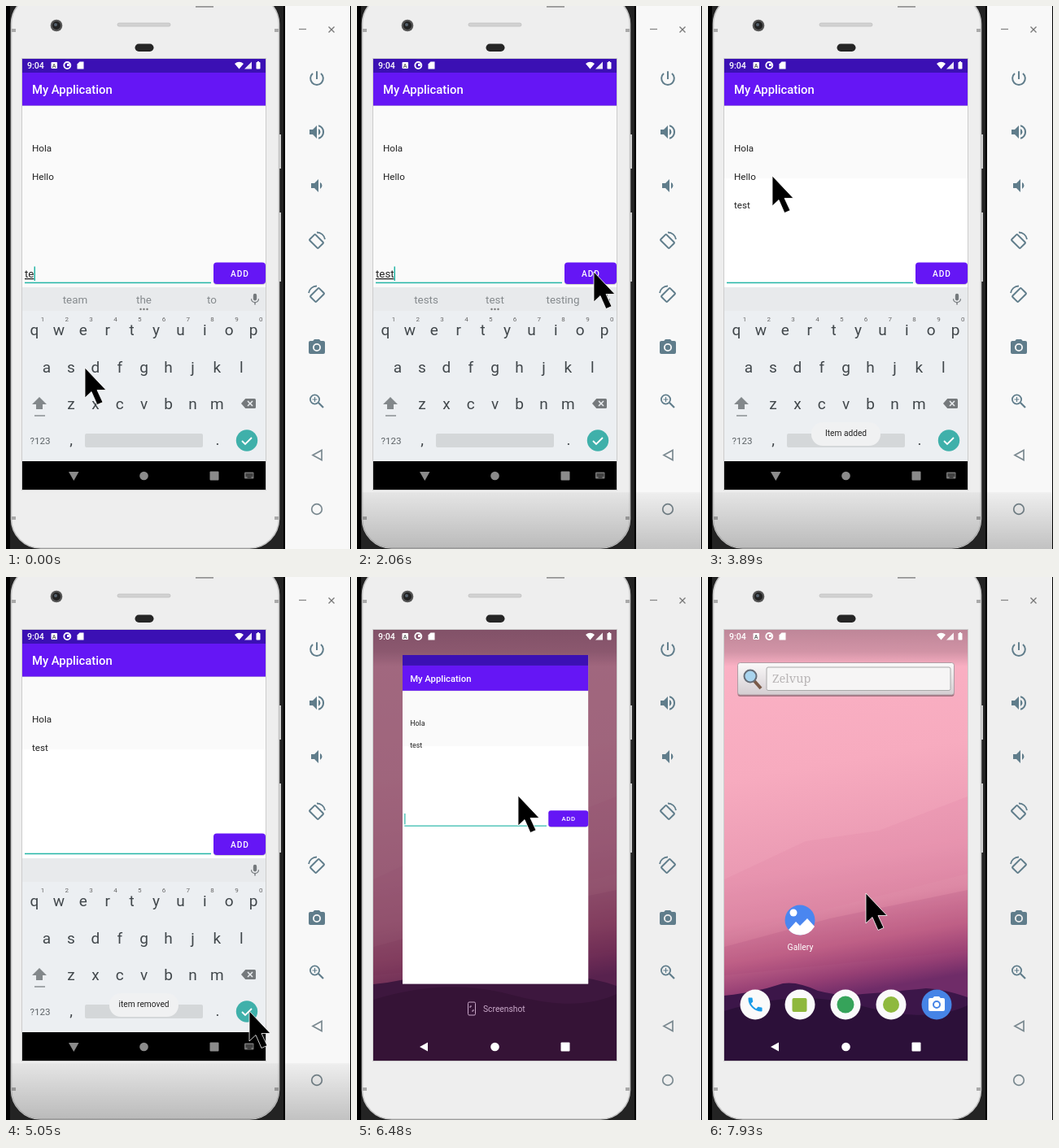
Recreate the animation shown at these times as an HTML page. Size 424 by 668 pixels, loop 8000 ms.

```html
<!DOCTYPE html>
<html lang="en">
<head>
<meta charset="utf-8">
<title>List app demo</title>
<style>
html, body { margin: 0; width: 100%; height: 100%; overflow: hidden; background: #000; }
svg { display: block; width: 424px; height: 668px; font-family: Roboto, sans-serif; }
</style>
</head>
<body>
<svg id="stage" viewBox="0 0 424 668"></svg>
<script>
const text = (x, y, size, str, fill, more = '') =>
  `<text x="${x}" y="${y}" font-size="${size}" fill="${fill}" ${more}>${str}</text>`;
const mid = (x, y, size, str, fill, more = '') =>
  text(x, y, size, str, fill, 'text-anchor="middle" ' + more);
const rect = (x, y, w, h, fill, more = '') =>
  `<rect x="${x}" y="${y}" width="${w}" height="${h}" fill="${fill}" ${more}/>`;
const dot = (x, y, r, fill, more = '') =>
  `<circle cx="${x}" cy="${y}" r="${r}" fill="${fill}" ${more}/>`;
const path = (d, fill, more = '') => `<path d="${d}" fill="${fill}" ${more}/>`;
const line = (d, color, w) => path(d, 'none', `stroke="${color}" stroke-width="${w}"`);
// a 24-unit icon centred on x, y
const icon = (x, y, s, d, fill, more) =>
  path(d, fill, `transform="translate(${x} ${y}) scale(${s}) translate(-12 -12)" ${more || ''}`);
const group = (id, body, more = '') => `<g id="${id}" ${more}>${body}</g>`;
const fade = (id, dir, stops) => `<linearGradient id="${id}" gradientUnits="userSpaceOnUse" ${dir}>` +
  stops.map(([o, c, a = 1]) => `<stop offset="${o}" stop-color="${c}" stop-opacity="${a}"/>`).join('') +
  '</linearGradient>';

const CAMERA = 'M9 2L7.2 4H4a2 2 0 0 0-2 2v12a2 2 0 0 0 2 2h16a2 2 0 0 0 2-2V6a2 2 0 0 0-2-2h-3.2L15 2zM12 17a5 5 0 1 1 0-10 5 5 0 0 1 0 10z';
const SPEAKER = 'M3 9v6h4l5 5V4L7 9zM16.5 12A4.5 4.5 0 0 0 14 8v8a4.5 4.5 0 0 0 2.5-4z';
const WAVE = 'M14 3.2v2.1a7 7 0 0 1 0 13.4v2.1a9 9 0 0 0 0-17.6z';
const POWER = 'M13 3h-2v10h2zM17.8 5.2l-1.4 1.4A7 7 0 1 1 7.6 6.6L6.2 5.2a9 9 0 1 0 11.6 0z';
const MIC = 'M12 14a3 3 0 0 0 3-3V5a3 3 0 0 0-6 0v6a3 3 0 0 0 3 3zM17.3 11a5.3 5.3 0 0 1-10.6 0H5a7 7 0 0 0 6 6.7V21h2v-3.3a7 7 0 0 0 6-6.7z';
const CALL = 'M6.6 10.8a15 15 0 0 0 6.6 6.6l2.2-2.2a1 1 0 0 1 1-.2 11 11 0 0 0 3.6.6 1 1 0 0 1 1 1V20a1 1 0 0 1-1 1A17 17 0 0 1 3 4a1 1 0 0 1 1-1h3.5a1 1 0 0 1 1 1 11 11 0 0 0 .6 3.6 1 1 0 0 1-.3 1z';

function sidebar() {
  const c = '#607d8b', g = '#7a8990';
  const turn = flip => `<g transform="translate(382 ${flip ? 354 : 288}) scale(${flip ? -1 : 1} 1)">` +
    rect(-7.5, -5, 15, 10, 'none', `rx="1" transform="translate(-.5 1.5) rotate(45)" stroke="${c}" stroke-width="2"`) +
    line('M0-9.500A10 10 0 0 1 10-1', c, 1.8) + '</g>';
  return rect(343, 0, 80, 668, '#f8f8f8', 'id="side"') +
    line('M360 28.5h9', '#888', 1.3) + line('M396.5 25.5l7 7m0-7l-7 7', '#777', 1.3) +
    icon(382, 89, .98, POWER, c) + icon(382, 155, 1, SPEAKER + WAVE, c) + icon(384, 221, 1, SPEAKER, c) +
    turn(false) + turn(true) + icon(382, 420, 1, CAMERA, c) + dot(382, 420, 3.2, c) +
    dot(379.5, 484, 5.6, 'none', `stroke="${c}" stroke-width="1.8"`) +
    line('M384 488l6 6', c, 2.2) + line('M376.5 484h6m-3-3v6', c, 1.2) +
    line('M388 546.5v12l-11-6z', g, 1.7) + dot(382, 619, 6.3, 'none', `stroke="${g}" stroke-width="1.7"`);
}

function phone() {
  const shape = 'x="6.5" y="-14" width="329" height="681" rx="36"';
  return rect(5, 0, 336, 668, '#232323') + rect(334, 158, 4, 42, '#d5d5d5') + rect(334, 254, 4, 85, '#d5d5d5') +
    `<rect ${shape} fill="#eeeeee" stroke="#c4c4c4" stroke-width="1.6"/>` +
    line('M7 30h5M330 30h5M7 630h5M330 630h5', '#aaa', 4) + line('M233 .8h22', '#999', 2) +
    group('shade', `<rect ${shape} fill="url(#low)"/>` + rect(343, 598, 80, 70, 'url(#low)')) +
    dot(62, 24, 7.3, '#555') + dot(62, 24, 5, '#222') + dot(61, 23, 2, '#53606c') +
    rect(137, 21, 65, 4, '#d2d2d2', 'rx="2" stroke="#bbb" stroke-width=".7"') +
    rect(158.5, 46.5, 23, 9.5, '#252525', 'rx="4.7"') +
    rect(19.5, 64.5, 300, 531, 'none', 'stroke="#ccc"');
}

function home() {
  const apps = [58, 113, 169, 225, 281].map((x, i) => dot(x, 526, 18.5, i < 4 ? '#fafafa' : '#4684e6')).join('');
  return rect(20, 65, 299, 530, 'url(#sky)') +
    path('M20 372L120 325L210 312L319 270V365L200 395L20 440Z', '#d9779a', 'opacity=".16"') +
    path('M20 455L150 420L319 385V460L20 490Z', '#9c3a6c', 'opacity=".15"') +
    group('hills', path('M20 515Q60 511 92 500Q110 497 135 509Q165 517 190 513Q240 509 268 506Q290 507 319 517V620H20Z', '#3c1649') +
      path('M20 534Q110 506 190 528T319 527V620H20Z', '#2c1039')) +
    rect(20, 65, 299, 45, 'url(#scrim)') + rect(20, 65, 299, 530, '#401832', 'id="dim"') +
    group('launcher',
      rect(36.5, 106, 266, 41, '#000', 'rx="3" opacity=".35"') +
      rect(36.5, 105.5, 266, 39.5, 'url(#bar)', 'rx="3" stroke="#b09ca4" stroke-width="1"') +
      rect(72, 111, 226, 28.5, '#f6f5f5', 'rx="2" stroke="#aaa" stroke-width="1"') +
      line('M57 128l8 9', '#7a5a48', 4) + dot(52, 122, 7.5, '#a9d4ee', 'stroke="#666d78" stroke-width="2"') +
      text(79, 130, 14.5, 'Zelvup', '#b9b5b6', 'font-family="Noto Serif, serif"') +
      dot(113, 422, 18.5, '#4a86f0') + dot(105, 413, 4.5, '#fff') +
      path('M99 434l9-10 5 5 9-9 9 10Q124 441 113 440.5 104 440 99 434Z', '#fff') +
      mid(113.5, 459, 10.4, 'Gallery', '#fff') + apps +
      icon(58, 526, .95, CALL, '#1a9be8') + rect(103.5, 518, 18, 17, '#8fb83d', 'rx="2"') +
      dot(169, 526, 10.5, '#36a35a') + dot(225, 526, 10, '#8fb93e') +
      icon(281, 526, 1, CAMERA, '#fff') + dot(281, 526, 3, '#fff')) +
    group('shot', rect(136.5, 523, 9, 16, 'none', 'rx="1.5" stroke="#c9a9c9"') +
      line('M139 530v-2h2m2 4v2h-2', '#c9a9c9', 1) + text(155, 535, 10.3, 'Screenshot', '#c9a9c9')) +
    path('M87 572.5v11l-10-5.5z', '#fff') + dot(169.5, 578, 5.3, '#fff') + rect(250.5, 572.5, 11, 11, '#fff', 'rx="1"');
}

function keyboard() {
  const ink = '#41474b';
  const row = (keys, x, y) => [...keys].map((k, i) => mid(x + i * 29.9, y, 19, k, ink)).join('');
  const digits = [...'1234567890'].map((k, i) => mid(45 + i * 29.8, 388, 8, k, '#666')).join('');
  return rect(20, 346, 299, 214, '#eceff2') + rect(20, 346, 299, 29, '#e8eaec') +
    [85, 169.5, 253].map((x, i) => mid(x, 366, 13.4, '', '#858a8d', `id="hint${i}"`)).join('') +
    group('dots', [165.5, 169.5, 173.5].map(x => dot(x, 373, 1.2, '#777')).join('')) +
    icon(306, 361, .72, MIC, '#74797c', 'id="mic"') +
    row('qwertyuiop', 35, 405) + digits + row('asdfghjkl', 50, 450.5) + row('zxcvbnm', 80, 496) +
    path('M41 481l9 9h-5v6h-8v-6h-5z', '#83888b') + line('M35 504h13', '#83888b', 1.4) +
    icon(298, 489, .75, 'M22 4H7L0 12l7 8h15a2 2 0 0 0 2-2V6a2 2 0 0 0-2-2z', '#75797c') +
    line('M297 486l6 6m0-6l-6 6', '#eceff2', 1.5) +
    mid(42, 539, 11.6, '?123', '#5d6367') + mid(80, 540, 19, ',', ink) + mid(260, 540, 19, '.', ink) +
    rect(97, 526, 145, 17, '#d4d7d9', 'rx="2"') + dot(296, 534.5, 13.2, '#3fb0aa') +
    line('M290 535l4 4 8-8', '#fff', 1.8) +
    group('pop', rect(-18, 1, 36, 81, '#000', 'rx="3" opacity=".18"') + rect(-18, 0, 36, 80, '#d0d4d7', 'rx="3"') +
      mid(0, 29, 25, '', '#333', 'id="popKey"') + mid(12, 39, 9, '…', '#777'));
}

function app() {
  return rect(20, 65, 299, 530, '#fafafa') + rect(20, 212, 299, 383, '#fff', 'id="plain"') +
    rect(20, 82, 299, 41, '#000', 'opacity=".18"') + rect(20, 82, 299, 40.5, '#6516f5') + rect(20, 65, 299, 17, '#3b10b4') +
    text(32, 108, 14.8, 'My Application', '#fff', 'font-weight="500"') +
    [179, 214, 249].map((y, i) => text(32, y, 11.65, '', '#222', `id="item${i}"`)).join('') +
    text(23, 334, 13.3, '', '#222', 'id="typed" text-decoration="underline"') +
    rect(23, 339.7, 229, 1.5, '#24b5a6') + rect(0, 320.5, 1.5, 17.5, '#24b5a6', 'id="caret"') +
    rect(255, 316.5, 64, 26.5, '#000', 'rx="4" opacity=".18"') + rect(255, 315.5, 64, 26.5, '#6516f5', 'rx="4" id="button"') +
    mid(287.5, 332.5, 10.2, 'ADD', '#fff', 'font-weight="500" letter-spacing=".9"');
}

const navBar = rect(20, 560, 299, 35, '#000') + path('M77 573h12.500l-6.200 11z', '#8b8b8b') + dot(169.5, 578, 5.3, '#8b8b8b') +
  rect(250.5, 572.5, 11, 11, '#8b8b8b', 'rx="1"') + rect(293, 573.5, 11.5, 8, '#777', 'rx="1"') +
  line('M294.5 576h9m-9 2h9m-7 2h5', '#000', .9);
const status = text(26, 77, 10.6, '9:04', '#fff', 'font-weight="500"') +
  rect(55.5, 69, 7.5, 8, '#fff', 'rx="1"') + mid(59.2, 76, 7, 'A', '#666', 'font-weight="700"') +
  dot(75.3, 73, 4, 'none', 'stroke="#fff" stroke-width="1.8"') + rect(75, 71, 3, 3, '#fff') +
  path('M90.5 68.5h5v9h-8v-6z', '#fff') + path('M281 71Q286.5 66.5 292 71L286.5 77.5z', '#fff') +
  path('M302 68.5v9h-9z', '#fff', 'opacity=".9"') + rect(307.5, 69, 5, 8.5, '#fff', 'rx=".8"') + rect(309, 68, 2, 1, '#fff');

const stage = document.getElementById('stage');
stage.innerHTML = '<defs>' +
  fade('low', 'x1="0" x2="0" y1="598" y2="668"', [[0, '#000', 0], [.01, '#000', .04], [1, '#000', .22]]) +
  fade('sky', 'x1="130" x2="210" y1="65" y2="530"',
    [[0, '#fbb2c5'], [.35, '#f7abbf'], [.6, '#ea9ab3'], [.72, '#dd89a5'], [.82, '#c4668a'], [.9, '#963f74'], [.95, '#6f2c68']]) +
  fade('scrim', 'x1="0" x2="0" y1="65" y2="110"', [[0, '#302030', .3], [.6, '#302030', .2], [1, '#302030', 0]]) +
  fade('bar', 'x1="0" x2="0" y1="105" y2="146"', [[0, '#fbfafa'], [1, '#d3ccd0']]) +
  '<clipPath id="screen"><rect x="20" y="65" width="299" height="530"/></clipPath></defs>' +
  sidebar() + phone() +
  group('view', home() + rect(56, 0, 228, 404, '#54434f', 'id="ghost"') + group('app', app()) + group('kb', keyboard()) +
    group('nav', navBar) + group('toast', rect(127, 512, 85, 29, '#f0f1f2', 'rx="14"') +
    mid(169.5, 529, 10.2, '', '#222', 'id="note"')) + status, 'clip-path="url(#screen)"') +
  path('M0-1V36L8 28.5L15 44.5L22 41.5L15 26.5H26Z', '#000', 'id="mouse" stroke="#fff" stroke-width=".8"');

const el = {};
stage.querySelectorAll('[id]').forEach(e => el[e.id] = e);
const alpha = (id, a) => el[id].setAttribute('opacity', a);
const say = (id, s) => { el[id].textContent = s; };
const place = (id, x, y, s = 1) => el[id].setAttribute('transform', `translate(${x} ${y}) scale(${s})`);
const ramp = (t, a, b) => Math.min(1, Math.max(0, (t - a) / (b - a)));
const within = (t, a, b) => +(t >= a && t < b);

// time, x, y of the pointer
const route = [
  [0, 97, 446], [300, 85, 444], [600, 85, 444], [900, 145, 400], [1180, 158, 392], [1330, 220, 377],
  [1480, 258, 352], [1770, 291, 328], [2510, 291, 328], [3400, 82, 213], [3470, 79, 210], [4300, 79, 210],
  [5050, 299, 535], [5200, 298, 556], [5500, 250, 578], [6000, 250, 578], [6480, 198, 270], [6650, 186, 226],
  [6800, 186, 226], [7350, 198, 6], [7500, 197, 37], [7650, 196, 150], [7790, 195, 310], [7930, 194, 390]];
function pointer(t) {
  const i = route.findIndex(k => k[0] > t);
  if (i < 0) return route.at(-1).slice(1);
  const [a, x, y] = route[i - 1], [b, u, v] = route[i], p = ramp(t, a, b);
  return [x + (u - x) * p, y + (v - y) * p];
}

const ticks = [0];
for (const [a, b, n] of [[150, 1180, 8], [1330, 2360, 8], [2510, 3470, 8], [3740, 3890, 2],
  [4300, 5200, 7], [5350, 6350, 8], [6480, 7500, 8], [7650, 7930, 3]])
  for (let i = 0; i < n; i++) ticks.push(Math.floor((a + (b - a) * i / (n - 1)) / 10) * 10);

function draw(t) {
  const [mx, my] = pointer(t);
  place('mouse', mx, my);

  const typed = t < 290 ? 'te' : t < 1175 ? 'tes' : t < 2355 ? 'test' : '';
  say('typed', typed);
  const hints = t < 440 ? ['team', 'the', 'to'] : t < 1470 ? ['tea', 'tes', 'test'] :
    t < 2355 ? ['tests', 'test', 'testing'] : ['', '', ''];
  hints.forEach((h, i) => say('hint' + i, h));
  alpha('dots', +(t < 2355));
  alpha('mic', 1 - within(t, 2355, 2700));
  el.caret.setAttribute('x', 23 + [0, 0, 11.5, 18, 22.5][typed.length]);
  alpha('caret', +(t < 2300 || Math.floor((t - 2300) / 500) % 2 === 0));

  const key = within(t, 290, 500) ? ['s', 80, 377] : within(t, 1175, 1470) ? ['t', 155, 331] : null;
  alpha('pop', key ? 1 : 0);
  if (key) { say('popKey', key[0]); place('pop', key[1], key[2]); }

  const items = t < 2355 ? ['Hola', 'Hello', ''] : t < 4440 ? ['Hola', 'Hello', 'test'] : ['Hola', 'test', ''];
  items.forEach((s, i) => say('item' + i, s));
  alpha('plain', +(t >= 2355));
  el.button.setAttribute('fill', within(t, 2200, 2650) ? '#7a32f7' : '#6516f5');

  say('note', t < 4460 ? 'Item added' : 'item removed');
  alpha('toast', t < 4460 ? ramp(t, 2360, 2660) - ramp(t, 4250, 4450) : ramp(t, 4460, 4760) - ramp(t, 5950, 6300));

  // the app shrinks to a card, which is then dragged off the top
  const shrink = ramp(t, 6000, 6350), gone = ramp(t, 7350, 7500);
  const drag = t < 6800 ? 0 : t <= 7350 ? 226 - my : 220 + 250 * gone;
  const scale = 1 - shrink * .237, swipe = Math.min(1, drag / 220);
  const cardX = 20 + 36 * shrink, cardY = 65 + 31 * shrink - drag;
  place('app', cardX - 20 * scale, cardY - 65 * scale, scale);
  alpha('app', 1 - swipe);
  el.ghost.setAttribute('y', cardY);
  alpha('ghost', swipe * .5 * (1 - gone));
  alpha('kb', 1 - ramp(t, 5950, 6150));
  alpha('nav', 1 - shrink);

  const dim = ramp(t, 6000, 6350) - ramp(t, 7350, 7600);
  alpha('dim', .48 * dim);
  place('hills', 0, -14 * dim);
  alpha('shot', within(t, 6340, 7490) * (1 - swipe * .55));
  alpha('launcher', ramp(t, 7450, 7780));
  alpha('shade', within(t, 1480, 6480));
  el.side.setAttribute('fill', t < 6480 ? '#f8f8f8' : '#efefef');
}

function loop(now) {
  const t = now % 8000;
  draw(ticks.findLast(k => k <= t + .5) ?? 0);
  requestAnimationFrame(loop);
}
requestAnimationFrame(loop);
</script>
</body>
</html>
```
